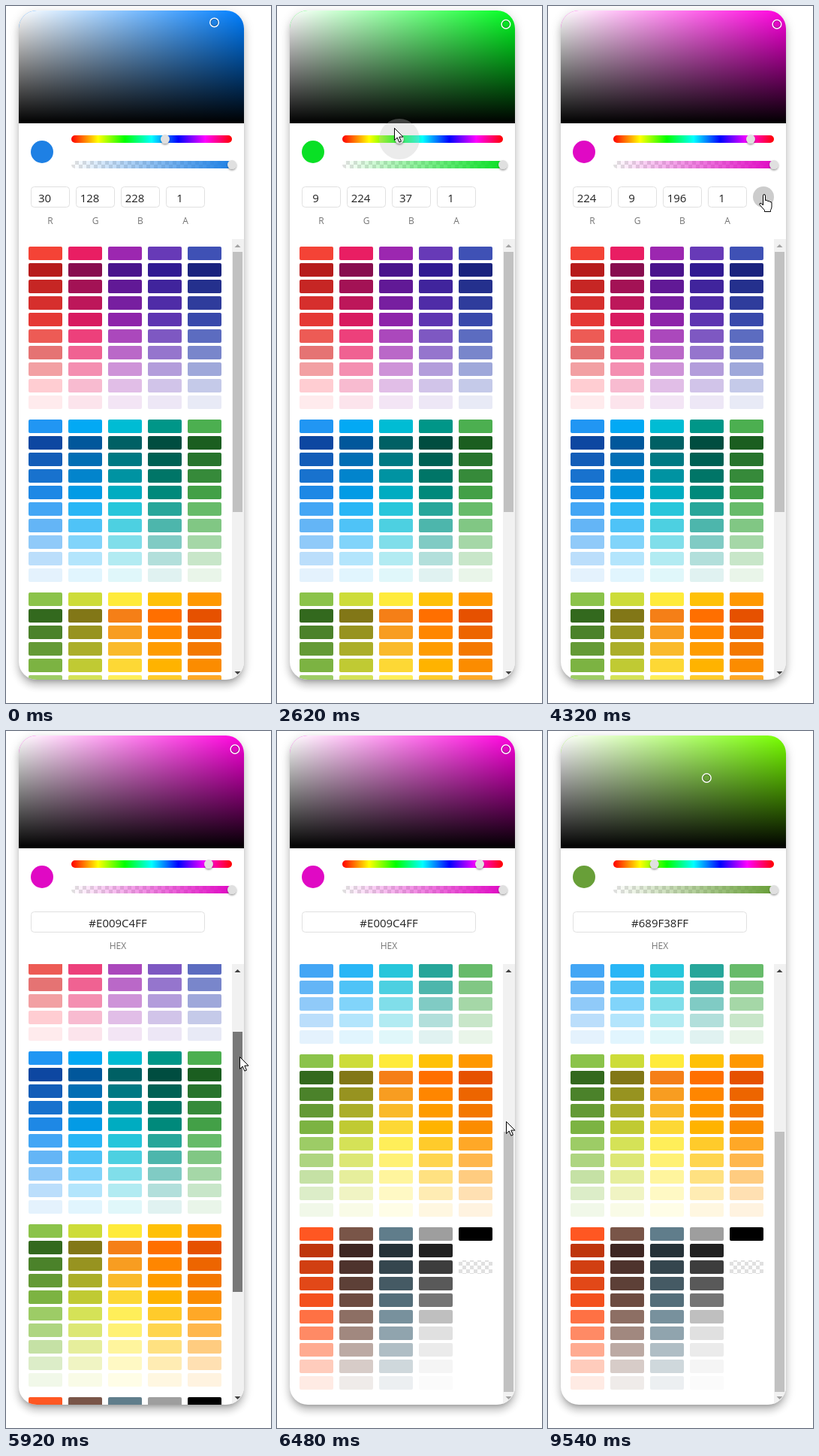
Write an HTML page that moves like this. It is 353x927 px and loops after 10 s.

```html
<!DOCTYPE html>
<html lang="en">
<head>
<meta charset="utf-8">
<title>Color picker</title>
<style>
  html, body { margin: 0; width: 100%; height: 100%; overflow: hidden; background: #fff; }
  .card {
    position: absolute; left: 17px; top: 6px; width: 300px; height: 890px;
    border-radius: 24px; background: #fff;
    box-shadow: 0 5px 5px -3px rgba(0,0,0,.2), 0 8px 10px 1px rgba(0,0,0,.14), 0 3px 14px 2px rgba(0,0,0,.12);
  }
  svg { position: absolute; left: 0; top: 0; display: block; }
  text { font-family: "Open Sans", "Noto Sans", sans-serif; text-anchor: middle; }
  .value { font-size: 15px; fill: #222; }
  .label { font-size: 12px; fill: #757575; }
  .field { fill: none; stroke: #e0e0e0; }
</style>
</head>
<body>
<div class="card"></div>
<svg id="stage" width="353" height="927" viewBox="0 0 353 927">
  <defs>
    <clipPath id="cardClip"><rect x="17" y="6" width="300" height="890" rx="24"/></clipPath>
    <clipPath id="listClip"><rect x="17" y="310" width="284" height="586"/></clipPath>
    <linearGradient id="white"><stop stop-color="#fff"/><stop offset="1" stop-color="#fff" stop-opacity="0"/></linearGradient>
    <linearGradient id="black" x2="0" y2="1"><stop stop-opacity="0"/><stop offset="1"/></linearGradient>
    <linearGradient id="hues"></linearGradient>
    <linearGradient id="fade"><stop id="fadeStart" stop-opacity="0"/><stop id="fadeEnd" offset="1"/></linearGradient>
    <pattern id="checks" x="2" y="6" width="10" height="10" patternUnits="userSpaceOnUse">
      <path d="M0 0h5v5h-5zM5 5h5v5h-5z" fill="#e0e0e0"/>
    </pattern>
    <filter id="soft" x="-50%" y="-50%" width="200%" height="200%">
      <feDropShadow dx="0" dy="1.5" stdDeviation="1.2" flood-opacity=".4"/>
    </filter>
  </defs>
  <g clip-path="url(#cardClip)">
    <rect id="hueFill" x="17" y="6" width="300" height="150"/>
    <rect x="17" y="6" width="300" height="150" fill="url(#white)"/>
    <rect x="17" y="6" width="300" height="150" fill="url(#black)"/>
    <g id="dot" fill="none">
      <circle r="5.75" stroke="#fff" stroke-width="1.5"/>
      <circle r="4.5" stroke="#000" stroke-opacity=".3"/>
    </g>
    <circle id="preview" cx="48" cy="194" r="15"/>
    <rect x="87" y="172" width="214" height="10" rx="5" fill="url(#hues)"/>
    <rect x="87" y="206" width="214" height="10" rx="5" fill="url(#checks)"/>
    <rect x="87" y="206" width="214" height="10" rx="5" fill="url(#fade)"/>
    <circle id="ripple" cy="177" r="27" fill="#c0c0c0" fill-opacity=".32"/>
    <circle id="hueThumb" cy="177" r="6" fill="#e0e0e0" filter="url(#soft)"/>
    <circle cx="301" cy="211" r="6" fill="#e0e0e0" filter="url(#soft)"/>
    <circle id="modeButton" cx="287" cy="254" r="14" fill="#ccc"/>
    <g id="four"></g>
    <g id="hex">
      <rect class="field" x="33.5" y="240.5" width="231" height="27" rx="4"/>
      <text class="value" id="hexValue" x="149" y="261"></text>
      <text class="label" x="149" y="290">HEX</text>
    </g>
    <g clip-path="url(#listClip)"><g id="swatches"></g></g>
    <rect x="301" y="310" width="16" height="586" fill="#f1f1f1"/>
    <path id="up" d="M304.5 321l4-4 4 4z"/>
    <path id="down" d="M304.5 885l4 4 4-4z"/>
    <rect id="bar" x="302" width="13" height="346"/>
  </g>
  <g id="cursor" fill="#fff" stroke="#000" stroke-linejoin="round">
    <path id="arrow" d="M.5.5V16.5L4.2 13 6.9 19.2 9.4 18.1 6.8 12.1H12Z"/>
    <path id="hand" transform="translate(-7 0)" d="M5.5 13V2.2a1.5 1.5 0 0 1 3 0V8.5q3-1 3 1 3-.8 3 1 2.5-.5 2.5 1.5v5q0 2-1.5 4.5v2H7.5v-2Q4 18 1.2 14.5q-1-2 .8-2.3 1.5 0 3.5 2.8Z"/>
  </g>
</svg>
<script>
const LOOP = 10000;
const $ = id => document.getElementById(id);

function add(parent, tag, attrs, text = '') {
  const el = document.createElementNS('http://www.w3.org/2000/svg', tag);
  for (const key in attrs) el.setAttribute(key, attrs[key]);
  el.textContent = text;
  return parent.appendChild(el);
}
const set = (id, attrs) => { for (const key in attrs) $(id).setAttribute(key, attrs[key]); };
const show = (id, on) => set(id, { visibility: on ? 'visible' : 'hidden' });
const clamp = (x, lo, hi) => Math.min(hi, Math.max(lo, x));
const lerp = (a, b, u) => a + (b - a) * u;

// Material shades per hue: 500, 900, 600, 300, 100; the rest are blended.
const PALETTE = [
  'F44336 B71C1C E53935 E57373 FFCDD2', 'E91E63 880E4F D81B60 F06292 F8BBD0',
  '9C27B0 4A148C 8E24AA BA68C8 E1BEE7', '673AB7 311B92 5E35B1 9575CD D1C4E9',
  '3F51B5 1A237E 3949AB 7986CB C5CAE9', '2196F3 0D47A1 1E88E5 64B5F6 BBDEFB',
  '03A9F4 01579B 039BE5 4FC3F7 B3E5FC', '00BCD4 006064 00ACC1 4DD0E1 B2EBF2',
  '009688 004D40 00897B 4DB6AC B2DFDB', '4CAF50 1B5E20 43A047 81C784 C8E6C9',
  '8BC34A 33691E 7CB342 AED581 DCEDC8', 'CDDC39 827717 C0CA33 DCE775 F0F4C3',
  'FFEB3B F57F17 FDD835 FFF176 FFF9C4', 'FFC107 FF6F00 FFB300 FFD54F FFECB3',
  'FF9800 E65100 FB8C00 FFB74D FFE0B2', 'FF5722 BF360C F4511E FF8A65 FFCCBC',
  '795548 3E2723 6D4C41 A1887F D7CCC8', '607D8B 263238 546E7A 90A4AE CFD8DC',
  '9E9E9E 212121 757575 E0E0E0 F5F5F5'
];
const parse = hex => [0, 2, 4].map(i => parseInt(hex.substr(i, 2), 16));
const css = rgb => `rgb(${rgb.map(Math.round)})`;
const mix = (a, b, u) => a.map((v, i) => lerp(v, b[i], u));

function shades(line) {
  const [base, dark, deep, light, pale] = line.split(' ').map(parse);
  return [base, dark, mix(dark, deep, 1 / 3), mix(dark, deep, 2 / 3), deep,
    mix(base, light, .5), light, mix(light, pale, .5), pale, mix(pale, [255, 255, 255], .6)];
}
function swatch(column, row, fill) {
  add($('swatches'), 'rect', {
    x: 30 + column % 5 * 53, y: 320 + Math.floor(column / 5) * 230 + row * 22,
    width: 45, height: 18, rx: 2, fill
  });
}
PALETTE.forEach((line, column) => shades(line).forEach((rgb, row) => swatch(column, row, css(rgb))));
swatch(19, 0, '#000');
swatch(19, 2, 'url(#checks)');

for (let i = 0; i <= 6; i++) add($('hues'), 'stop', { offset: i / 6, 'stop-color': `hsl(${i * 60},100%,50%)` });

const fields = [0, 1, 2, 3].map(i => {
  const x = 33.5 + i * 60;
  add($('four'), 'rect', { class: 'field', x, y: 240.5, width: 51, height: 27, rx: 4 });
  return {
    value: add($('four'), 'text', { class: 'value', x: x + 18, y: 261 }),
    label: add($('four'), 'text', { class: 'label', x: x + 25.5, y: 290 })
  };
});

// Each key is [time, ...values].
function track(keys, t) {
  let i = keys.findIndex(key => key[0] > t);
  if (i < 0) i = keys.length;
  if (i === 0) return keys[0].slice(1);
  const a = keys[i - 1], b = keys[i] || a;
  const u = b === a ? 0 : (t - a[0]) / (b[0] - a[0]);
  const eased = (u + u * u * (3 - 2 * u)) / 2;
  return a.slice(1).map((v, k) => lerp(v, b[k + 1], eased));
}
const POINTER = [
  [200, 336, 32], [620, 278, 22], [1000, 290, 33], [1480, 305, 24], [1540, 303, 27], [1690, 303, 27],
  [2100, 205, 166], [2620, 156, 162], [2700, 156, 162], [3060, 264, 166], [3400, 288, 250], [4780, 288, 250],
  [5640, 299, 346], [5700, 306, 360], [6100, 314, 489], [6340, 312, 567], [6600, 300, 480], [7160, 300, 480],
  [7440, 208, 438], [7820, 191, 492], [8140, 113, 492], [8200, 113, 492], [8320, 86, 492], [8480, 86, 492],
  [8620, 60, 505], [9000, 45, 508], [9180, 45, 508], [9540, 353, 140]
];
const TONE = [[620, .8684, .8941], [1000, .91, .82], [1480, .9598, .8784]];
const HUE = [[2100, 210.2], [2620, 127.8], [2700, 127.8], [3060, 307.8]];
const THUMB = [[7440, 307.8], [7700, 45], [8620, 45], [8880, 92.04]];
const MODES = [[0, 'RGBA'], [3680, 'HSLA'], [3960, 'HEX'], [4240, 'RGBA'], [4480, 'HSLA'], [4740, 'HEX']];

function colorAt(t) {
  if (t >= 8620) return [92.04, .6478, .6235];
  if (t >= 7440) return [45, .9725, 1];
  return [...track(HUE, t), ...track(TONE, t)];
}
function toRgb([h, s, v]) {
  return [5, 3, 1].map(n => {
    const k = (n + h / 60) % 6;
    return Math.round(255 * (v - v * s * clamp(Math.min(k, 4 - k), 0, 1)));
  });
}
function toHsl([h, s, v]) {
  const l = v * (1 - s / 2);
  const sat = (v - l) / Math.min(l, 1 - l);
  return [Math.round(h), +sat.toFixed(2), +l.toFixed(2)];
}

function render(t) {
  const hsv = colorAt(t), rgb = toRgb(hsv), color = css(rgb);
  const [px, py] = track(POINTER, t);
  const mode = MODES.filter(m => m[0] <= t).pop()[1];

  set('hueFill', { fill: `hsl(${hsv[0]},100%,50%)` });
  set('dot', { transform: `translate(${17 + 300 * hsv[1]} ${6 + 150 * (1 - hsv[2])})` });
  set('preview', { fill: color });
  set('fadeStart', { 'stop-color': color });
  set('fadeEnd', { 'stop-color': color });
  const hueX = 87 + 214 * (t < 7440 ? hsv[0] : track(THUMB, t)[0]) / 360;
  set('hueThumb', { cx: hueX });
  set('ripple', { cx: hueX });
  show('ripple', t >= 2060 && t < 3150);

  show('hex', mode === 'HEX');
  show('four', mode !== 'HEX');
  if (mode === 'HEX') {
    $('hexValue').textContent = '#' + [...rgb, 255].map(v => v.toString(16).padStart(2, '0')).join('').toUpperCase();
  } else {
    const values = [...(mode === 'RGBA' ? rgb : toHsl(hsv)), 1];
    fields.forEach((field, i) => {
      field.value.textContent = values[i];
      field.label.textContent = mode[i];
    });
  }

  const dragging = t >= 5700 && t < 6340;
  const scroll = t < 5700 ? 0 : dragging ? clamp(Math.round((py - 360) / .589), 0, 350) : 350;
  set('swatches', { transform: `translate(0 ${-scroll})` });
  set('bar', { y: 327 + Math.round(scroll * .589), fill: dragging ? '#787878' : '#c1c1c1' });
  set('up', { fill: scroll > 0 ? '#404040' : '#a3a3a3' });
  set('down', { fill: scroll < 350 ? '#404040' : '#a3a3a3' });

  const overButton = Math.hypot(px - 287, py - 254) < 14;
  show('modeButton', overButton);
  const present = t >= 200 && t < 9540;
  show('arrow', present && !overButton);
  show('hand', present && overButton);
  set('cursor', { transform: `translate(${Math.round(px)} ${Math.round(py)})` });
}

const start = performance.now();
function frame() {
  render((performance.now() - start) % LOOP);
  requestAnimationFrame(frame);
}
frame();
</script>
</body>
</html>
```
